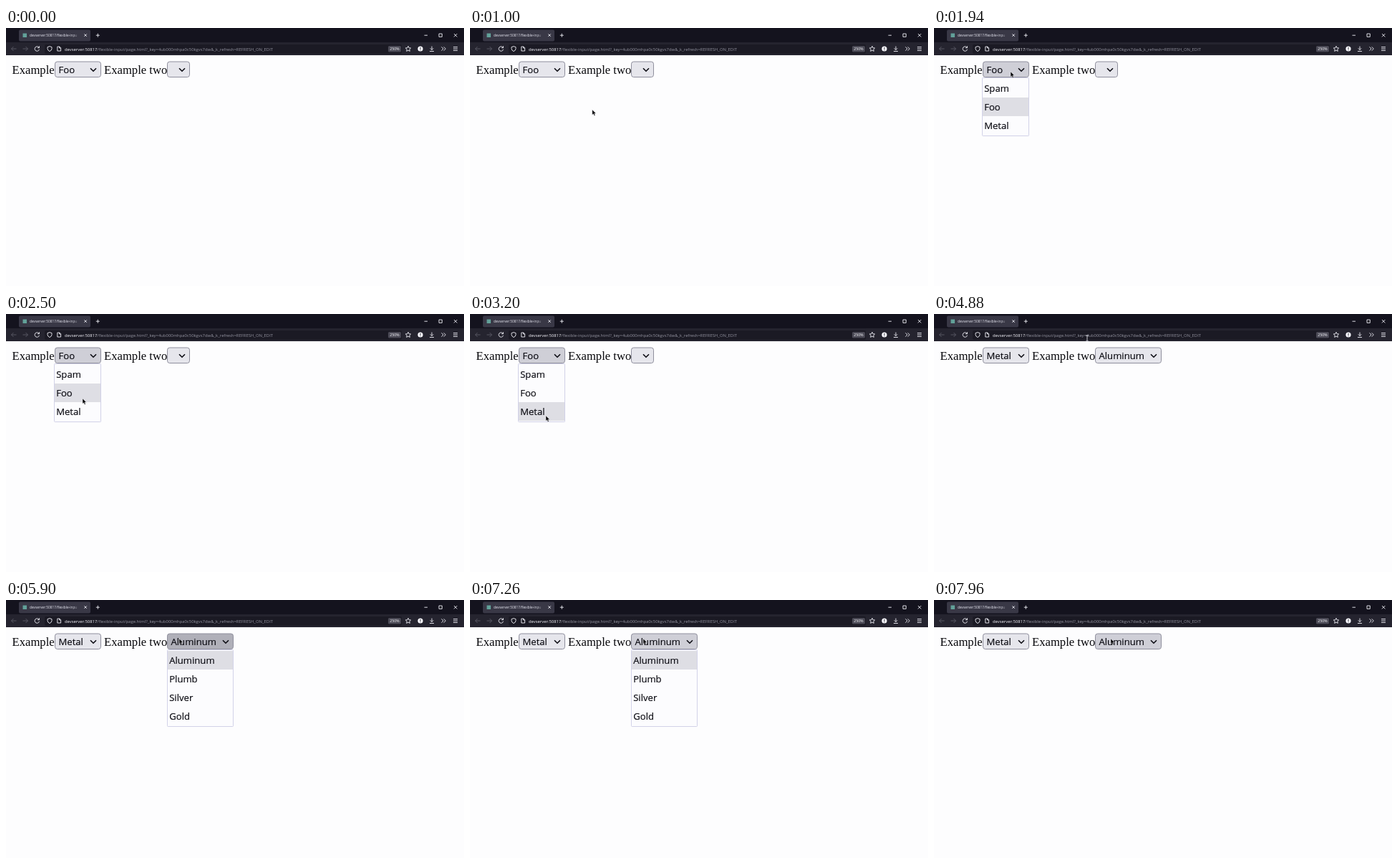
Write an HTML page that moves like this. It is 640 px wide and 360 px high and loops after 8 s.

```html
<!DOCTYPE html>
<html lang="en">
<head>
<meta charset="utf-8">
<title>Linked selects</title>
<style>
  html, body { margin: 0; width: 100%; height: 100%; overflow: hidden; background: #fdfdfe; }
  svg { display: block; width: 100vw; height: 100vh; }
  .label { font: 16.67px "Liberation Serif", serif; fill: #08080c; }
  .ui { font: 13.1px "Open Sans", sans-serif; fill: #0b0b12; stroke: #0b0b12; stroke-width: .18; }
  .tiny { font: 5.9px "Open Sans", sans-serif; fill: #9494a0; }
  .icon { fill: none; stroke: #f0f0f6; stroke-width: .9; }
  .dim { stroke: #5c5c68; }
  .chevron { fill: none; stroke: #0b0b12; stroke-width: 1.6; }
  .box { stroke: #8f8f9d; stroke-width: 1; }
</style>
</head>
<body>
<svg viewBox="0 0 640 360">
  <defs>
    <linearGradient id="fade" gradientUnits="userSpaceOnUse" x1="92" x2="105">
      <stop stop-color="#e6e6f0"/><stop offset="1" stop-color="#e6e6f0" stop-opacity="0"/>
    </linearGradient>
  </defs>
  <rect width="640" height="360" fill="#fdfdfe"/>

  <!-- Browser chrome -->
  <rect width="640" height="20" fill="#14131e"/>
  <rect y="20" width="640" height="18" fill="#25242f"/>
  <rect x="18" y="2.5" width="100" height="16" rx="2" fill="#393846"/>
  <rect x="54" y="23" width="499" height="13" rx="2" fill="#1b1a24"/>
  <rect x="23.5" y="7.5" width="5.5" height="5.5" fill="#62a199"/>
  <text x="33" y="12" class="tiny" style="font-size:4.8px;fill:url(#fade)">devserver:50817/flexible-inpu</text>
  <text x="82" y="31.5" class="tiny"><tspan fill="#f4f4fa">devserver:50817</tspan>/flexible-input/page.html?_key=4ub000mhpa0c50kgvs7dw&amp;_k_refresh=REFRESH_ON_EDIT</text>
  <g class="icon">
    <path class="dim" d="M14.5 29h-7m3-3-3 3 3 3M23.5 29h7m-3-3 3 3-3 3"/>
    <path d="M46 27.2a3.2 3.2 0 1 0 .5 2.6M46.5 25.3v2.4h-2.4"/>
    <path d="M61 25.6l3 1v2.2q0 2.4-3 3.8q-3-1.4-3-3.8v-2.2z"/>
    <path d="M71.8 26h3l1.8 1.8v4.2h-4.8zM74.5 26v2h2"/>
    <path d="M109.4 8.4l3.4 3.4m0-3.4-3.4 3.4M125.8 10.2h5m-2.5-2.5v5"/>
    <path d="M584.5 10.2h4.5M605 8h4.3v4.3h-4.3zM626 8l4.4 4.4m0-4.4-4.4 4.4"/>
    <path d="M562 25.3l1.1 2.4 2.6.3-1.9 1.8.5 2.6-2.3-1.3-2.3 1.3.5-2.6-1.9-1.8 2.6-.3z"/>
    <path d="M595 25.5v5m-2.2-2.2 2.2 2.2 2.2-2.2M592 32.5h6"/>
    <path d="M608.5 26.3l2.6 2.7-2.6 2.7m3.2-5.4 2.6 2.7-2.6 2.7M625 26.6h6m-6 2.4h6m-6 2.4h6"/>
  </g>
  <rect x="534" y="25" width="18" height="8.5" rx="1.5" fill="#4a4955"/>
  <text x="543" y="31.2" class="tiny" text-anchor="middle" style="font-size:5.3px;fill:#fafaff">250%</text>
  <circle cx="579" cy="29" r="3.6" fill="#fafaff"/>
  <path d="M579 27v2.5m0 .8v.9" stroke="#25242f"/>

  <!-- Page -->
  <text x="8.5" y="64" class="label">Example</text>
  <text x="137" y="64" class="label">Example two</text>
  <g id="selects"></g>
  <path id="arrow" d="M0 0v7.2l1.7-1.5 1.2 2.7 1.3-.6-1.2-2.6h2.3z" fill="#050508" stroke="#fdfdfe" stroke-width=".4"/>
  <path id="beam" d="M-2 -4h4M0 -4v8M-2 4h4" fill="none" stroke="#dedee6" stroke-width=".9"/>
</svg>
<script>
const LOOP = 8000;
const OPEN_FIRST = 1460, PICK = 3640, OPEN_SECOND = 5640, CLOSE_SECOND = 7820;
const IDLE = '#e6e6ec', HOVER = '#cfcfd7', PRESSED = '#b0b0b9';

// Pointer stops: time, x, y
const route = [
  [20, 300, 190], [820, 190, 130], [1400, 107, 61], [1980, 107, 61],
  [2400, 107, 118], [2560, 107, 118], [3200, 106, 142], [3640, 106, 140],
  [3900, 105, 134], [4180, 105, 134], [4860, 214, 34], [5060, 214, 34],
  [5560, 242, 54], [7260, 242, 54], [7560, 247, 54], [8000, 247, 54]
];

const byId = id => document.getElementById(id);
const between = (t, from, to) => t >= from && t < to;

function pointerAt(t) {
  const i = Math.max(1, route.findIndex(stop => stop[0] >= t));
  const [t0, x0, y0] = route[i - 1], [t1, x1, y1] = route[i];
  const p = Math.max(0, (t - t0) / (t1 - t0));
  const eased = p * p * (3 - 2 * p);
  return [x0 + (x1 - x0) * eased, y0 + (y1 - y0) * eased];
}

function select(x, width, value, fill) {
  const arrowX = x + width - 15;
  return `<rect class="box" x="${x + .5}" y="47" width="${width - 1}" height="21.5" rx="3.2" fill="${fill}"/>
    <text class="ui" x="${x + 5.5}" y="63">${value}</text>
    <path class="chevron" d="M${arrowX} 56.2l4 4 4-4"/>`;
}

function list(x, width, options, active) {
  const rows = options.map((name, i) => {
    const y = 71 + 26 * i;
    const bar = i === active ? `<rect x="${x + 1}" y="${y}" width="${width - 2}" height="26" fill="#dedee4"/>` : '';
    return `${bar}<text class="ui" x="${x + 3.2}" y="${y + 18}">${name}</text>`;
  });
  const height = 26 * options.length + 3;
  return `<rect x="${x + .5}" y="69.5" width="${width - 1}" height="${height}" rx=".8" fill="#fcfcfe" stroke="#cdcde6" stroke-width=".9"/>
    ${rows.join('')}`;
}

let shown = '';
function draw(now) {
  const t = now % LOOP;
  const [x, y] = pointerAt(t);
  const picked = t >= PICK;
  const firstOpen = between(t, OPEN_FIRST, PICK);
  const secondOpen = between(t, OPEN_SECOND, CLOSE_SECOND);
  const overRow = between(y, 47, 69);
  const firstFill = between(t, OPEN_FIRST, 1600) ? PRESSED
    : firstOpen || (overRow && between(x, 68, 133)) ? HOVER : IDLE;
  const secondFill = between(t, OPEN_SECOND, 6100) ? PRESSED
    : secondOpen || (t > 5000 && overRow && x > 225) ? HOVER : IDLE;

  let markup = select(68, 65, picked ? 'Metal' : 'Foo', firstFill)
    + select(225, picked ? 93 : 32, picked ? 'Aluminum' : '', secondFill);
  if (firstOpen) markup += list(67, 66, ['Spam', 'Foo', 'Metal'], y > 123 ? 2 : 1);
  if (secondOpen) markup += list(225, 93, ['Aluminum', 'Plumb', 'Silver', 'Gold'], 0);
  if (markup !== shown) byId('selects').innerHTML = shown = markup;

  const overChrome = y < 38;
  for (const [id, visible] of [['arrow', !overChrome && t >= 20], ['beam', overChrome]]) {
    byId(id).setAttribute('transform', `translate(${x} ${y})`);
    byId(id).setAttribute('visibility', visible ? 'visible' : 'hidden');
  }
}

function tick() {
  draw(performance.now());
  requestAnimationFrame(tick);
}
tick();
</script>
</body>
</html>
```
